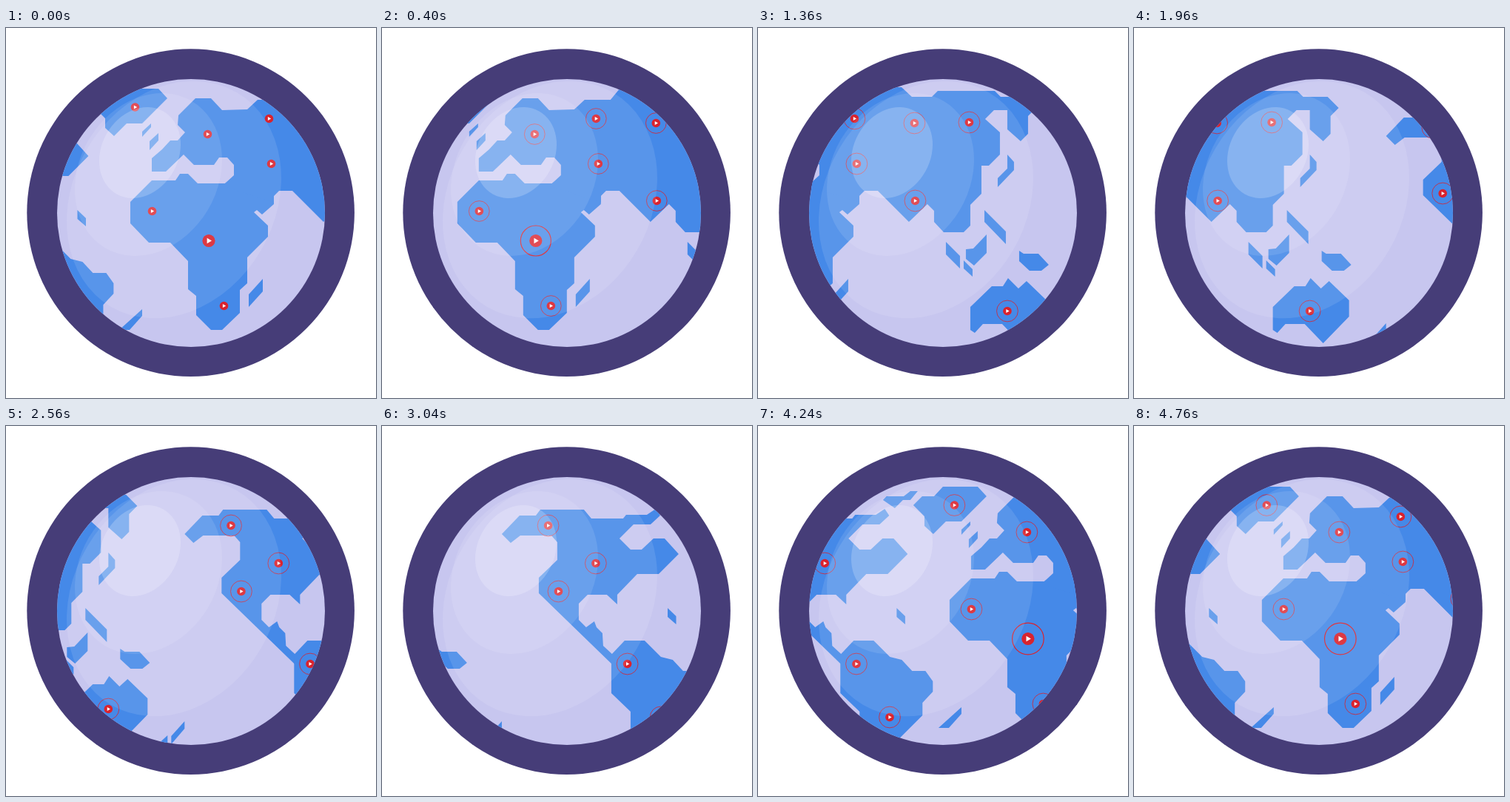
Write an HTML page that moves like this. It is 500 by 500 pixels and loops after 4.8 s.

```html
<!DOCTYPE html>
<html lang="en">
<head>
<meta charset="utf-8">
<title>Turning globe</title>
<style>
  html, body { margin: 0; width: 100%; height: 100%; overflow: hidden; background: #fff; }
  svg { display: block; width: 100vw; height: 100vh; }
</style>
</head>
<body>
<svg viewBox="0 0 500 500">
  <defs>
    <clipPath id="disc"><circle cx="250" cy="250" r="181"/></clipPath>
    <g id="land" fill="#4589e8">
      <!-- Africa and Arabia -->
      <polygon points="168,235 197,206 229,206 235,197 246,197 259,210 296,210 305,203 350,205 362,227 362,238 346,252 339,246 335,249 354,267 354,282 326,310 326,345 316,354 316,385 292,408 277,408 257,388 257,362 246,353 246,315 222,290 193,290 168,264"/>
      <!-- Europe and Asia -->
      <polygon points="296,210 308,199 308,185 299,175 288,175 281,185 254,185 240,171 216,194 197,194 197,176 211,164 222,152 232,152 242,141 232,131 233,118 256,95 277,95 292,111 326,110 340,97 375,97 389,80 419,80 433,93 460,93 468,85 545,85 553,93 586,93 601,108 590,119 590,143 580,153 562,137 562,111 544,111 532,123 552,141 552,171 537,186 527,186 527,224 512,239 512,267 503,276 476,276 463,262 463,247 454,238 429,262 387,220 369,220 362,227 362,236 297,215"/>
      <!-- North America -->
      <polygon points="665,146 689,121 711,121 717,113 776,113 786,125 829,125 833,120 861,120 873,112 879,121 866,133 843,133 824,152 839,167 854,167 870,152 885,152 904,173 877,200 848,200 821,228 821,241 807,228 781,228 769,240 769,262 779,272 790,264 793,272 801,280 802,297 815,309 815,323 715,226 715,205 740,181 740,157 732,148 690,148 677,158"/>
      <!-- South America -->
      <polygon points="813,309 831,290 858,290 880,312 896,316 910,331 928,331 938,345 938,359 924,374 924,391 895,420 870,445 839,445 839,386 813,361"/>
      <!-- Greenland and northern islands -->
      <polygon points="119,107 134,122 134,135 146,146 163,129 184,129 192,121 218,95 206,82 159,82 147,95 131,95"/>
      <polygon points="78,100 83,95 106,95 115,88 125,88 115,100 105,100 94,111"/>
      <polygon points="184,147 184,140 196,129 196,134"/>
      <polygon points="194,153 206,142 206,152 194,165"/>
      <!-- Atlantic and Indian Ocean -->
      <polygon points="96.500,246 108,257 108,268 96.500,258"/>
      <polygon points="328,360 347,339 347,356 328,377"/>
      <polygon points="153,408 184,380 184,389 167,408"/>
      <!-- Australia and the Pacific -->
      <polygon points="512,377 541,349 556,349 563,338 577,352 588,342 615,368 615,390 580,426 555,400 529,400 518,412 512,408"/>
      <polygon points="578,301 584,305 604,305 618,320 608,328 592,328 578,315"/>
      <polygon points="531,246 560,275 560,292 531,262"/>
      <polygon points="562,171 571,181 571,192 549,215 549,203 562,190"/>
      <polygon points="534,279 534,304 517,321 506,312 506,299 516,298"/>
      <polygon points="479,289 498,308 498,325 479,306"/>
      <polygon points="503,314 515,326 515,336 503,325"/>
      <polygon points="647,419 665,399 665,409 647,430"/>
      <polygon points="629,430 642,418 642,430"/>
    </g>
    <g id="pin">
      <circle class="ring" fill="none" stroke="#d9232e" stroke-width=".8"/>
      <circle r="5.800" fill="#d9232e"/>
      <path d="M-1.600-2.500 2.700 0-1.600 2.500z" fill="#fff"/>
    </g>
    <g id="pins"></g>
  </defs>
  <rect width="500" height="500" fill="#fff"/>
  <circle cx="249.600" cy="249.600" r="221.300" fill="#463d78"/>
  <g clip-path="url(#disc)">
    <rect x="60" y="60" width="380" height="380" fill="#c7c6ef"/>
    <g id="map"></g>
    <g fill="#fff">
      <ellipse rx="167.900" ry="136.100" transform="translate(227 232) rotate(-59.500)" opacity=".1"/>
      <ellipse rx="115.200" ry="93.400" transform="translate(192.500 198) rotate(-59.500)" opacity=".1"/>
      <ellipse rx="64.200" ry="51.800" transform="translate(181 168.500) rotate(-60.800)" opacity=".2"/>
    </g>
  </g>
</svg>
<script>
  const LOOP = 4800, STEP = 40, SPEED = 0.1655, WIDTH = 792.6;
  const GROW = 600, RING = 14.4;
  const PINS = [
    [174.5, 107], [272.5, 143.5], [355.5, 122.5], [358.5, 183.5],
    [197.5, 247.5], [294.5, 375.5], [274, 287.5, 1.48],
    [436.5, 128.5], [510.5, 127.5], [437.5, 233.5], [562, 382.5],
    [741.6, 223.5], [727.7, 134.5], [792, 185.5], [834.7, 321.5], [879.7, 393.5]
  ];

  const $ = id => document.getElementById(id);
  const map = $('map'), ring = document.querySelector('.ring');

  function use(parent, id, transform) {
    const el = document.createElementNS('http://www.w3.org/2000/svg', 'use');
    el.setAttribute('href', '#' + id);
    el.setAttribute('transform', transform);
    parent.append(el);
  }

  for (const [x, y, size = 1] of PINS) use($('pins'), 'pin', `translate(${x} ${y}) scale(${size})`);
  for (const id of ['land', 'pins'])
    for (const turn of [-1, 0, 1]) use(map, id, `translate(${turn * WIDTH} 0)`);

  function draw(ms) {
    const t = Math.floor(ms % LOOP / STEP) * STEP;
    const p = Math.min(t / GROW, 1);
    map.setAttribute('transform', `translate(${-SPEED * t} 0)`);
    ring.setAttribute('r', RING * (1 - (1 - p) ** 3));
  }

  const start = performance.now();
  function tick() {
    draw(performance.now() - start);
    requestAnimationFrame(tick);
  }
  tick();
</script>
</body>
</html>
```
